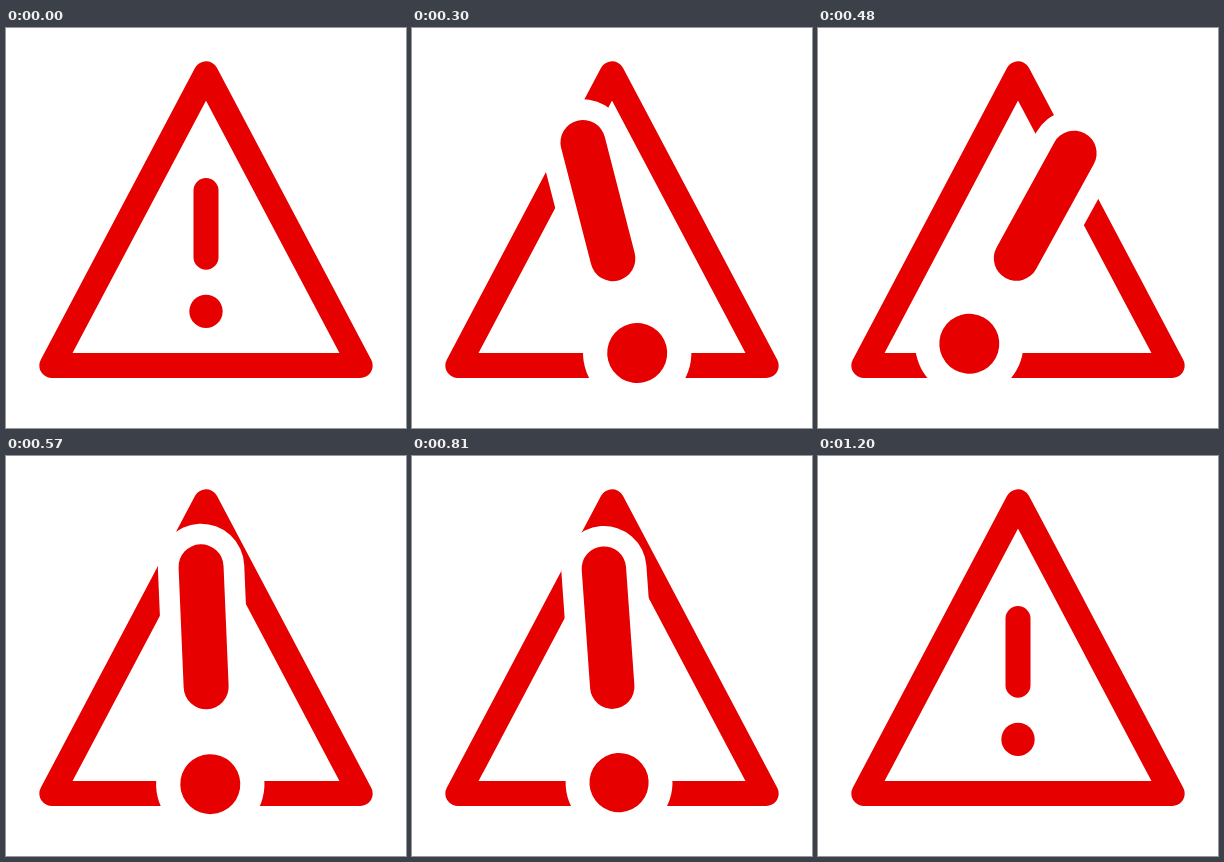
Recreate the animation shown at these times as an HTML page. Size 400 by 400 pixels, loop 4230 ms.

```html
<!DOCTYPE html>
<html lang="en">
<head>
<meta charset="utf-8">
<title>Warning sign</title>
<style>
  html, body { margin: 0; width: 100%; height: 100%; overflow: hidden; background: #fff; }
  svg { display: block; width: 100%; height: 100%; }
  path { fill: none; stroke: #e60000; stroke-width: 25; stroke-linecap: round; stroke-linejoin: round; }
  circle { fill: #e60000; }
  .halo path { stroke: #fff; stroke-width: 48; }
  .halo circle { fill: #fff; }
</style>
</head>
<body>
<svg viewBox="0 0 400 400">
  <path d="M200 45.83 354.17 337.5H45.83Z"/>
  <g id="mark">
    <g class="halo">
      <path d="M200 162.5V229.17"/>
      <circle cx="200" cy="283.33" r="30.1"/>
    </g>
    <path d="M200 162.5V229.17"/>
    <circle cx="200" cy="283.33" r="16.67"/>
  </g>
</svg>
<script>
const LOOP = 4230, STEP = 30, PIVOT_Y = 227.2;
const mark = document.getElementById('mark');

// Keys: [time in ms, value, optional handles of the ease leading to the key]
const scaleKeys = [[0, 1], [300, 1.8], [750, 1.8], [1200, 1, 0.49, 0.29]];
const angleKeys = [[0, 0], [204, 30], [348, -30], [492, 30], [640, -30], [861, 0]];

// Cubic Bezier ease with flat ends and handles at x = a and x = b
function ease(x, a = 1 / 3, b = 2 / 3) {
  let lo = 0, hi = 1;
  for (let i = 0; i < 24; i++) {
    const u = (lo + hi) / 2, v = 1 - u;
    if (3 * u * v * (v * a + u * b) + u ** 3 < x) lo = u;
    else hi = u;
  }
  return lo * lo * (3 - 2 * lo);
}

function valueAt(keys, t) {
  const i = keys.findIndex(key => key[0] > t);
  if (i < 0) return keys[keys.length - 1][1];
  const [t0, v0] = keys[i - 1], [t1, v1, a, b] = keys[i];
  return v0 + (v1 - v0) * ease((t - t0) / (t1 - t0), a, b);
}

function draw(t) {
  const s = valueAt(scaleKeys, t), angle = valueAt(angleKeys, t);
  mark.setAttribute('transform',
    `translate(200 ${PIVOT_Y}) rotate(${angle}) scale(${s}) translate(-200 ${-PIVOT_Y})`);
}

const start = performance.now();
function tick() {
  const t = (performance.now() - start) % LOOP;
  draw(Math.floor(t / STEP) * STEP);
  requestAnimationFrame(tick);
}
tick();
</script>
</body>
</html>
```
